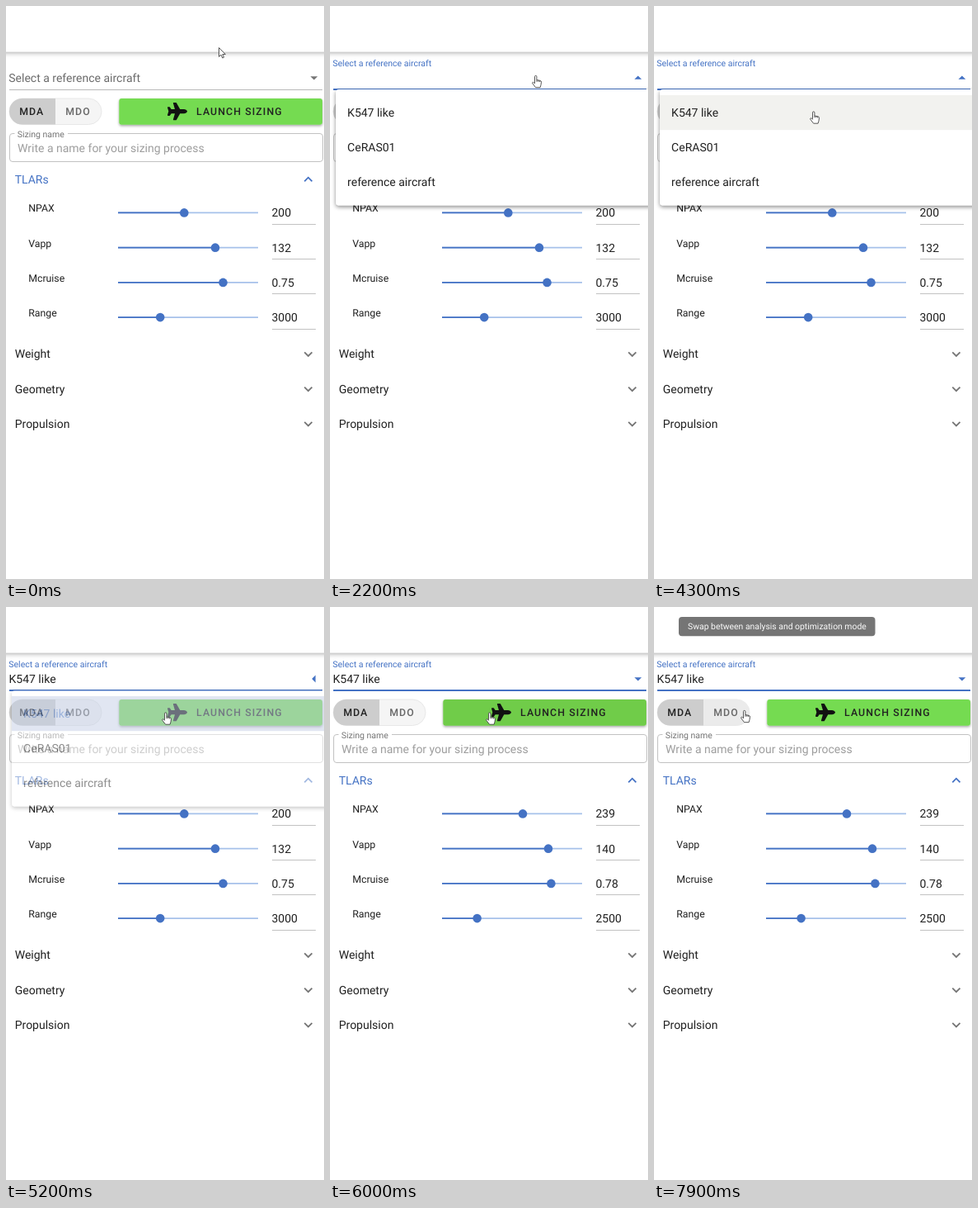
Write an HTML page that moves like this. It is 386 by 694 pixels and loops after 8 s.

```html
<!DOCTYPE html>
<html lang="en">
<head>
<meta charset="utf-8">
<title>Sizing form</title>
<style>
html, body { margin: 0; width: 100%; height: 100%; overflow: hidden; background: #fff }
svg { display: block; width: 386px; height: 694px }
text { font: 14px Roboto, sans-serif; fill: #212121; text-rendering: geometricPrecision; white-space: pre }
.small { font-size: 10.5px }
.label { font-size: 12.32px }
.caps { font-size: 12.32px; font-weight: 500; letter-spacing: .0893em }
.chevron { fill: none; stroke: #757575; stroke-width: 1.8 }
.line { stroke: #c2c2c2 }
</style>
</head>
<body>
<svg viewBox="0 0 386 694">
  <defs>
    <filter id="soft" x="-20%" y="-50%" width="140%" height="200%">
      <feDropShadow dx="0" dy="0" stdDeviation="3.5" flood-opacity=".5"/>
    </filter>
    <filter id="raised" x="-10%" y="-50%" width="120%" height="200%">
      <feDropShadow dx="0" dy="1.5" stdDeviation="1.5" flood-opacity=".36"/>
    </filter>
    <filter id="floating" x="-10%" y="-20%" width="120%" height="140%">
      <feDropShadow dx="0" dy="2" stdDeviation="2.8" flood-opacity=".45"/>
    </filter>
  </defs>

  <rect x="-30" width="446" height="55.3" fill="#fff" filter="url(#soft)"/>

  <!-- aircraft select -->
  <text id="label">Select a reference aircraft</text>
  <text id="choice" x="3.5" y="91.7">K547 like</text>
  <path id="underline"/>
  <path id="caret" d="M-4.4-1.8h8.8L0 2.6z"/>

  <!-- mode toggle -->
  <rect x="4" y="112" width="112" height="31.5" rx="15.75" fill="#f5f5f5" stroke="#e4e4e4" stroke-width=".8"/>
  <path id="mdo" d="M60 112h40.25a15.75 15.75 0 0 1 0 31.5H60z" fill="#ebebeb"/>
  <path d="M60 112H19.75a15.75 15.75 0 0 0 0 31.5H60z" fill="#cdcdcd"/>
  <text class="caps" x="16.2" y="131.9">MDA</text>
  <text class="caps" x="72.2" y="131.9" style="fill:#666">MDO</text>

  <!-- launch button -->
  <rect id="launch" x="137.3" y="112" width="246.7" height="31.7" rx="3" filter="url(#raised)"/>
  <path transform="translate(196 116.9) scale(.0417)" fill="#111" d="M480 192H366L261 8a16 16 0 0 0-14-8h-66c-10 0-18 10-15 20l49 172H112l-43-58c-3-4-8-6-13-6H16C6 128-2 138 0 148l32 108L0 364c-2 10 6 20 16 20h40c5 0 10-2 13-6l43-58h103l-49 172c-3 10 5 20 15 20h66c6 0 11-3 14-8l105-184h114c35 0 96-29 96-64s-61-64-96-64z"/>
  <text class="caps" x="231" y="131.9">LAUNCH SIZING</text>

  <!-- name input -->
  <path class="line" fill="none" d="M10.5 154.5H8a3.5 3.5 0 0 0-3.5 3.5v27a3.5 3.5 0 0 0 3.5 3.5H381a3.5 3.5 0 0 0 3.5-3.5v-27a3.5 3.5 0 0 0-3.5-3.5H75"/>
  <text class="small" x="13.7" y="159" style="fill:#757575">Sizing name</text>
  <text x="14" y="176.7" style="fill:#9e9e9e">Write a name for your sizing process</text>

  <!-- sections -->
  <text x="10.7" y="215" style="fill:#4472c4">TLARs</text>
  <path class="chevron" d="M362.3 212.3l4.6-4.6 4.6 4.6" style="stroke:#4472c4"/>
  <g id="sections"></g>
  <g id="rows"></g>

  <!-- dropdown -->
  <g id="menu">
    <rect x="7" y="101" width="400" height="140.6" rx="4" fill="#fff" filter="url(#floating)"/>
    <rect id="active" x="7" y="108" width="400" height="42.2"/>
    <text id="first" x="21.1" y="134">K547 like</text>
    <text x="21.1" y="176.2">CeRAS01</text>
    <text x="21.1" y="218.4">reference aircraft</text>
  </g>

  <g id="tip">
    <rect x="30" y="12" width="238.5" height="23.3" rx="4" fill="#757575"/>
    <text x="41" y="27" style="font-size:10.4px;fill:#fafafa">Swap between analysis and optimization mode</text>
  </g>

  <path id="arrow" fill="#fff" stroke="#444" stroke-width=".9" d="M.5.5V11.4L3 9.1 4.8 13 6.5 12.2 4.8 8.5H8.3z"/>
  <g id="hand" fill="#fff" stroke="#444" stroke-width=".9" stroke-linejoin="round">
    <path d="M3.5 9V1.6a1.2 1.2 0 0 1 2.4 0V5.5l4.3.9q1.4.3 1.3 1.8l-.5 3.4-.9 3.1H4.6L.8 9.7q-.5-1.1.5-1.4 1-.1 2.2 1.5z"/>
    <path d="M5.9 5.5v2.3M7.8 6v1.8M9.7 6.4V8" fill="none"/>
  </g>
</svg>
<script>
const LOOP = 8000, TICK = 100, PITCH = 42.24, BLUE = '#4472c4';
const el = id => document.getElementById(id);
const set = (id, attrs) => { for (const k in attrs) el(id).setAttribute(k, attrs[k]); };
const show = (id, on) => set(id, { opacity: +on });
const mix = (a, b, p) => a + (b - a) * p;
const ramp = (t, from, to) => Math.min(1, Math.max(0, (t - from) / (to - from)));
const ease = (t, from, to) => { const p = ramp(t, from, to); return p * p * (3 - 2 * p); };

// name, thumb and value before and after the choice
const rows = [
  ['NPAX', 216.3, 234, '200', '239'],
  ['Vapp', 254, 265, '132', '140'],
  ['Mcruise', 263.5, 268.4, '0.75', '0.78'],
  ['Range', 187.2, 178.6, '3000', '2500']
];

el('sections').innerHTML = ['Weight', 'Geometry', 'Propulsion'].map((name, i) => {
  const y = 421.4 + i * PITCH;
  return `<text x="10.7" y="${y + 4.9}">${name}</text>
    <path class="chevron" d="M362.3 ${y - 2}l4.6 4.6 4.6-4.6"/>`;
}).join('');

el('rows').innerHTML = rows.map(([name], i) => {
  const y = 250.4 + i * PITCH;
  return `<text class="label" x="27.2" y="${y - 1}">${name}</text>
    <path d="M136 ${y}H306" stroke="#a6c1ea" stroke-width="1.9"/>
    <path id="track${i}" stroke="${BLUE}" stroke-width="1.9"/>
    <circle id="thumb${i}" cy="${y}" r="5.3" fill="${BLUE}"/>
    <text id="value${i}" x="322.5" y="${y + 5}"></text>
    <path class="line" d="M323 ${Math.round(y + 13.6) + .5}h53"/>`;
}).join('');

function pointer(t) {
  const a = ease(t, 0, 700), b = ease(t, 3900, 4300), c = ease(t, 7400, 7800);
  return [mix(258, 245, a) - 56 * b - 84 * c, mix(50, 84, a) + 43.5 * b - 2.5 * c];
}

function draw(t) {
  const focus = t >= 2200, chosen = t >= 5200, hover = t >= 400;
  const tint = focus ? BLUE : '#757575';

  set('label', { x: 3.3, y: focus ? 73 : 92, class: focus ? 'small' : '' });
  el('label').style.fill = focus ? BLUE : '#6b6b6b';
  show('choice', chosen);
  set('underline', {
    d: focus ? 'M4 101H384' : 'M4 101.5H384',
    stroke: focus ? BLUE : hover ? '#6e6e6e' : '#b8b8b8',
    'stroke-width': focus ? 1.8 : 1
  });
  const turn = chosen ? 180 * (1 - ramp(t, 5100, 5300)) : focus ? 180 : 0;
  set('caret', { fill: tint, transform: `translate(373.9 87) rotate(${turn})` });

  show('menu', focus ? (1 - ramp(t, 5000, 5400)) : 0);
  set('active', { fill: chosen ? '#c4cfe6' : t >= 4200 ? '#f2f2ef' : '#fff' });
  el('first').style.fill = chosen ? BLUE : '#212121';

  const p = ease(t, 5200, 5500);
  rows.forEach(([, x0, x1, v0, v1], i) => {
    const x = mix(x0, x1, p);
    set('thumb' + i, { cx: x });
    set('track' + i, { d: `M136 ${250.4 + i * PITCH}H${x}` });
    el('value' + i).textContent = t >= 5300 ? v1 : v0;
  });

  set('launch', { fill: t >= 5400 && t < 7600 ? '#6fcc49' : '#75db51' });
  show('mdo', t >= 7700);
  show('tip', ramp(t, 7500, 7900));

  const [x, y] = pointer(t), at = { transform: `translate(${x} ${y})` };
  set('arrow', at);
  set('hand', at);
  show('arrow', y < 62);
  show('hand', y >= 62);
}

const start = performance.now();
function frame() {
  const t = (performance.now() - start) % LOOP;
  draw(Math.floor(t / TICK) * TICK);
  requestAnimationFrame(frame);
}
frame();
</script>
</body>
</html>
```
